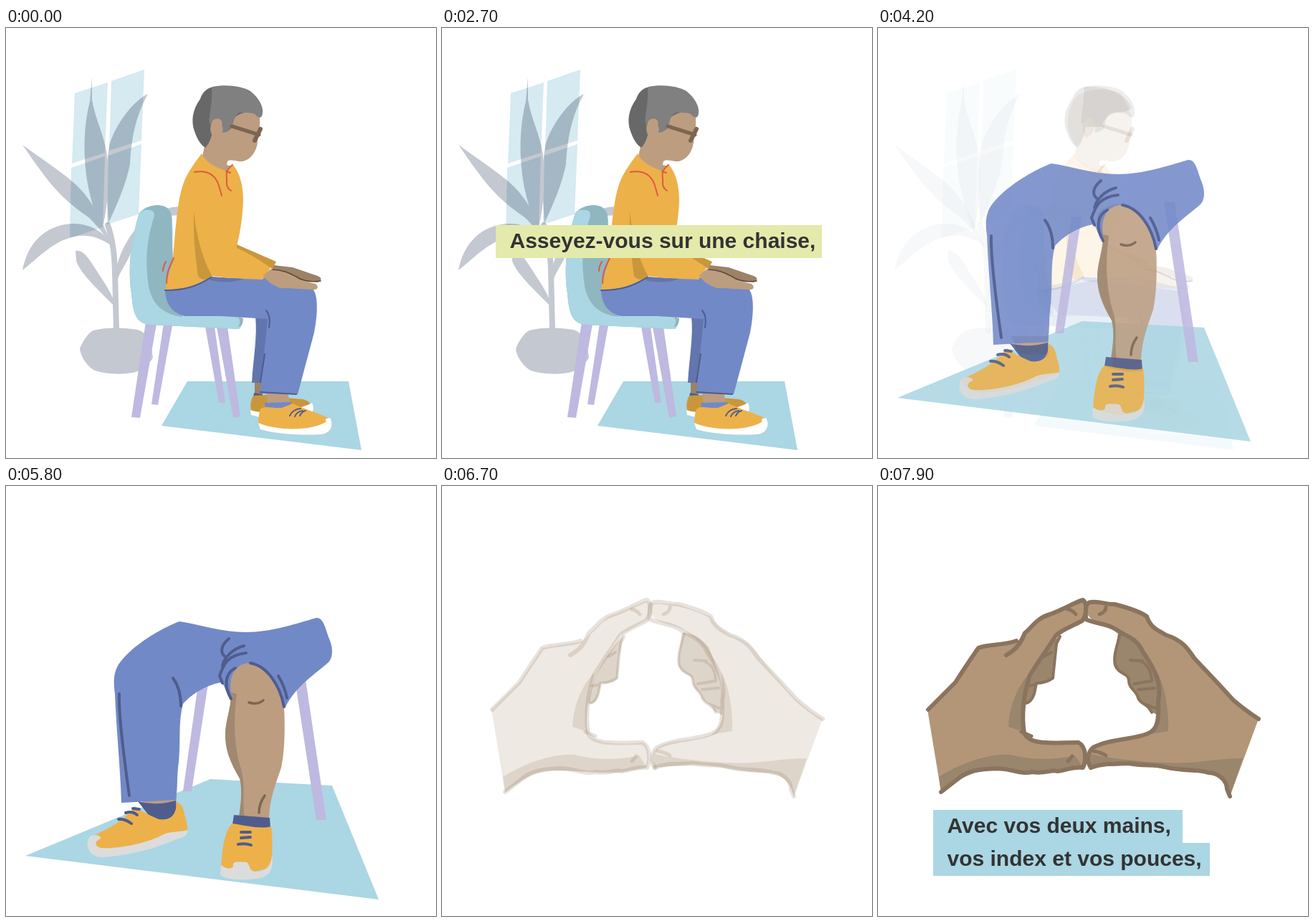
Animation, 600 px wide and 600 px high, one loop 8000 ms. Source, as an HTML page with a canvas:

```html
<!DOCTYPE html>
<html lang="fr">
<head>
<meta charset="utf-8">
<title>Exercice sur une chaise</title>
<style>
html, body { margin: 0; width: 100%; height: 100%; overflow: hidden; background: #fff; }
canvas { display: block; width: 600px; height: 600px; }
</style>
</head>
<body>
<canvas id="stage" width="600" height="600"></canvas>
<script>
const ctx = document.getElementById('stage').getContext('2d');
const LOOP = 8000, STEP = 100;

const SKY = '#abd6e3', SKY_DARK = '#90b6c0', LILAC = '#beb9e0', GREY = '#c4c8d0';
const AMBER = '#edb14a', AMBER_DARK = '#c9973b', RED = '#dd5b3f';
const BLUE = '#7289c8', BLUE_DARK = '#6375ad', NAVY = '#4f5d8d';
const SKIN = '#bc9d80', SKIN_DARK = '#9c8268', BROWN = '#7d6650';
const PALM = '#b39678', PALM_DARK = '#9a856d', EDGE = '#8b745e';

const shape = (color, d, mode) => ({ color, path: new Path2D(d), mode });
const line = (color, width, d) => ({ color, width, path: new Path2D(d) });
// The same outline filled twice, so it stays denser while fading.
const layered = (under, over, d) => [shape(under, d), shape(over, d)];

const plantAndWindow = [
  shape(GREY, 'M120 68L117 102C110 130 107 165 112 205C116 235 126 265 134 283C142 250 146 205 140 172C136 148 124 125 120 100Z'),
  shape(GREY, 'M198 92C175 103 150 140 144 165C138 200 141 240 143 272C158 240 168 215 173 190C175 155 180 125 198 92Z'),
  shape(GREY, 'M23 163C60 190 95 212 110 232C124 250 134 268 149 306C138 290 128 276 115 264C88 246 66 224 50 201C40 188 32 176 23 163Z'),
  shape(GREY, 'M23 338C30 300 55 275 92 273C115 272 140 285 149 305C128 290 112 288 96 291C66 297 46 320 23 338Z'),
  shape(GREY, 'M97 311C108 309 115 321 126 338C136 354 150 372 153 390C136 372 104 344 98 325Z'),
  shape(GREY, 'M154 336C162 300 190 252 242 249C260 247 280 252 300 262C270 261 240 260 220 263C200 268 188 280 180 295C175 320 160 338 156 350Z'),
  line(GREY, 8, 'M142 275Q151 300 152 340L154 422'),
  shape(GREY, 'M103 447C108 436 114 426 122 422C140 417 165 418 183 421C194 424 198 432 202 440L205 460C200 470 190 473 184 479C165 485 140 483 124 478C115 473 104 460 103 447Z'),
  shape('#d5eaf1', 'M96 91L142 76L138 174L92 189ZM147 74L193 58L189 157L144 171ZM91 195L138 179L135 278L89 293ZM143 178L189 162L185 260L141 274Z', 'multiply')
];

const chair = [
  shape(SKY, 'M253 493L478 493L496 589L217 555Z'),
  shape(LILAC, 'M220 412L232 415L212 526L203 525Z'),
  shape(LILAC, 'M278 417L291 417L306 523L297 523Z'),
  shape(LILAC, 'M195 410L210 413L187 544L175 543Z'),
  shape(LILAC, 'M294 417L309 417L327 542L317 544Z'),
  ...layered(SKY_DARK, SKY, 'M186 258C195 247 220 243 228 254C234 262 232 290 232 320L242 401L324 402C332 404 331 415 325 420L200 414C180 412 177 395 175 370C169 330 176 290 186 258Z'),
  shape(SKY_DARK, 'M190 255C205 243 228 245 231 262L233 325L246 403C222 400 204 388 199 360C193 320 198 290 207 262C208 254 200 252 190 255Z'),
  shape(SKY_DARK, 'M331 405C331 413 328 417 323 417C327 414 327 407 324 403Z')
];

const sitterLegs = [
  shape(SKIN_DARK, 'M347 492L357 492L358 515L347 515Z'),
  shape(NAVY, 'M346 509L358 511L359 518L345 516Z'),
  shape(AMBER_DARK, 'M345 513C340 522 341 531 343 537L424 535C429 527 424 520 414 518L390 516L365 512Z'),
  shape('#fff', 'M341 533C360 540 405 535 427 523C430 529 429 535 425 540L354 543L342 540Z'),
  shape(BLUE_DARK, 'M228 366L300 352L422 367L428 402L405 505L358 495L343 495C345 460 351 430 348 403L252 400Z'),
  shape(SKIN, 'M363 509L393 509L397 526L365 526Z'),
  shape(BLUE, 'M361 523L398 522L400 529Q384 535 362 530Z'),
  shape(AMBER, 'M355 532C360 526 370 531 385 530L400 524C415 531 440 539 452 545C455 555 440 560 425 559C400 562 370 560 352 552C352 545 353 537 355 532Z'),
  shape('#fff', 'M352 551C380 563 430 562 447 549Q443 545 452 544C457 552 455 565 440 567C410 569 375 566 355 560Z'),
  line(NAVY, 2, 'M396 541Q400 532 411 531M403 542Q406 535 414 534M410 541Q413 535 418 534'),
  shape(BLUE, 'M222 364C235 358 260 358 286 347C310 349 340 350 362 348L428 364C436 373 435 400 430 425L407 511L355 510C358 470 362 440 365 406L300 402L250 402C232 398 222 385 222 364Z'),
  line(NAVY, 2, 'M363 394Q370 402 367 418M361 455L355 494M355 508L405 511')
];

const sitterBody = [
  shape(SKIN, 'M277 165C264 150 260 128 272 102C282 84 320 82 340 92L354 122C355 142 352 148 351 160C349 174 341 183 331 186C322 187 314 182 309 186L308 191L315 193L311 202C298 200 280 188 274 179Z'),
  shape(AMBER, 'M273 175C277 185 287 192 308 200L316 190C327 203 331 220 331 242C330 265 326 290 322 304L375 326L358 351C330 350 310 349 287 346C265 360 245 366 222 365C226 345 231 335 233 320C236 290 238 250 245 225C250 205 262 190 273 175Z'),
  shape(AMBER_DARK, 'M262 257C266 290 273 320 288 347C282 353 272 352 268 346C264 320 261 285 262 257Z'),
  shape(AMBER_DARK, 'M322 302L377 326L372 336L355 325Q340 315 322 307Z'),
  shape(BLUE_DARK, 'M285 347Q305 349 331 350Q310 358 285 352Z'),
  line(NAVY, 2, 'M222 366C250 366 268 360 286 348'),
  line(RED, 2, 'M263 201C281 198 291 205 296 217Q299 226 301 234M316 191C303 201 309 208 308 214Q307 223 314 227M307 200L313 202M219 339Q219 333 223 326M224 356C224 341 228 334 234 321'),
  shape('#686868', 'M289 82C281 84 274 89 271 99C260 114 258 130 263 144C267 156 272 163 278 167C285 160 287 150 290 138L312 138Q316 117 345 117L354 112C345 88 310 80 289 82Z'),
  shape('#808080', 'M289 82C305 78 330 81 341 88C350 95 360 108 358 119C357 128 351 125 347 120C342 118 332 118 326 118C317 122 318 135 314 141Q308 146 302 146C304 137 302 128 296 126C290 126 285 133 284 136C282 120 289 105 287 83Z'),
  shape(SKIN, 'M286 135C287 126 298 123 301 130C304 139 300 150 291 153C286 149 284 142 286 135Z'),
  line(BROWN, 5, 'M315 137L353 149'),
  line(BROWN, 6, 'M355 141L347 157'),
  shape(SKIN_DARK, 'M374 331L400 334L435 346C441 348 441 353 435 355L415 352L385 339L371 337Z'),
  shape(SKIN, 'M359 345L371 335L391 340L415 353L432 357C437 361 435 366 428 365C410 364 395 363 383 363C372 359 362 352 359 345Z'),
  line('#5e4936', 1.6, 'M372 337C390 338 397 343 405 347Q418 356 439 353')
];

const sitter = [...plantAndWindow, ...chair, ...sitterLegs, ...sitterBody];

const legs = [
  shape(SKY, 'M285 409L455 418L520 577L27 516Z'),
  shape(LILAC, 'M270 263L284 263L259 426L247 426Z'),
  shape(LILAC, 'M399 243L414 243L447 466L433 466Z'),
  shape(SKIN, 'M308 258C316 248 328 246 337 246C364 249 384 280 388 309C390 345 388 375 384 393C375 420 366 440 367 476L327 476C330 440 332 425 327 410C316 390 306 365 306 345C308 320 314 310 314 296C306 285 303 268 308 258Z'),
  shape('#a08970', 'M314 288L322 290C318 320 317 360 328 395C335 420 329 440 333 462L325 462C328 440 330 425 326 408C312 385 305 365 306 345C307 325 314 310 314 288Z'),
  shape(SKIN, 'M186 430L238 430L237 455L196 455Z'),
  shape(BLUE, 'M242 189C270 193 300 204 335 204C370 204 405 192 433 184C443 183 446 200 451 213C457 227 456 240 450 246C430 264 405 278 389 310L387 308C381 280 362 250 337 247C318 250 308 268 316 298C307 291 306 280 301 274C285 276 262 287 247 304C240 330 244 355 241 385C238 405 240 420 237 438L161 442C160 400 154 340 152 290C149 265 150 252 172 232C190 215 220 197 242 189Z'),
  line(NAVY, 4, 'M158 290C157 320 164 375 172 432M233 268Q244 283 244 307'),
  line(NAVY, 4, 'M311 213C298 224 299 234 307 239M332 223C316 227 304 240 302 251M335 233C310 236 304 247 298 265L302 275'),
  line(NAVY, 4, 'M320 254C304 262 305 281 314 297M341 247C364 251 382 277 388 308M380 265Q389 280 392 296'),
  line(BROWN, 3.5, 'M339 302Q351 306 359 299M361 432Q353 443 353 456'),
  shape(NAVY, 'M184 440Q209 447 237 439L238 456C225 470 210 467 198 458Z'),
  shape(AMBER, 'M180 447C190 455 202 460 213 465C228 468 238 460 238 441C248 444 248 455 251 465C254 475 254 481 251 484C225 488 200 502 170 506C150 510 130 510 121 498L117 490C140 480 164 468 180 447Z'),
  shape('#dcdcdc', 'M117 489C122 486 133 487 132 492C123 496 123 502 132 505C160 507 200 497 218 487C230 481 245 483 253 480C254 486 250 490 240 492C215 503 180 515 135 518C115 518 109 500 117 489Z'),
  line(NAVY, 4, 'M157 465Q166 464 175 471M167 456Q176 453 183 459M177 450L186 451'),
  shape(NAVY, 'M318 459L368 463L369 478C355 482 330 478 316 472Z'),
  shape(AMBER, 'M316 471C335 474 355 479 370 475C372 490 372 510 370 532L335 541L300 531C302 505 305 480 316 471Z'),
  shape('#dcdcdc', 'M300 529C305 533 313 536 317 531C316 524 320 524 336 525C342 530 338 538 350 538C362 538 370 530 371 516C374 532 370 545 350 548C325 551 305 549 299 542Z'),
  line(NAVY, 4, 'M328 483L341 483M328 491L341 490M324 500Q334 498 342 501')
];

const leftHand = [
  ...layered(PALM, PALM_DARK, 'M253 209C235 228 213 255 204 302C210 307 216 301 219 290L222 275C232 277 243 272 245 268L247 240Z'),
  line(EDGE, 4, 'M254 210L249 220L244 268Q234 275 221 275L218 290Q214 301 207 303M232 238L242 232M209 279L221 277'),
  shape(PALM, 'M69 312L108 274L140 226L195 217L230 183L286 160L290 163L288 186L248 208C238 225 215 255 209 285C200 310 200 335 205 349C225 362 255 360 280 358C290 362 290 385 286 393L255 398C225 402 180 395 140 398C120 402 105 415 88 427Z'),
  shape(PALM_DARK, 'M85 406C110 390 150 373 185 375C215 383 250 382 275 376L286 393L255 399C220 404 180 395 150 397C125 400 105 415 88 428Z'),
  shape(PALM_DARK, 'M213 260C193 280 183 310 182 336L203 343C200 320 205 290 213 260Z'),
  line(EDGE, 6, 'M70 312L108 274Q122 252 140 226C155 220 175 223 193 216M179 236C195 227 200 217 205 205C215 197 222 184 240 179C260 172 275 162 286 159C293 164 291 180 285 188C270 196 255 201 248 209C238 225 222 247 212 264C203 290 200 320 204 345C213 364 252 357 280 358C292 365 290 385 286 393C270 391 260 398 250 398C240 395 235 402 215 399C200 403 185 394 165 394C140 395 125 398 115 406Q102 416 88 427'),
  line(EDGE, 5, 'M265 172Q271 173 276 179M271 377L265 384M200 343L214 349')
];

const rightHand = [
  ...layered(PALM, PALM_DARK, 'M335 205C333 225 328 235 330 250C335 265 348 260 350 272C350 285 360 285 363 297C370 306 375 303 380 314L391 320C397 290 385 255 372 225C355 205 340 205 335 205Z'),
  line(EDGE, 4, 'M338 206C333 225 328 237 331 250C336 264 350 260 350 272C350 283 361 285 363 296C368 306 376 303 382 316M352 243L369 244M367 245Q381 251 382 272L357 276M363 284L386 282M372 304L387 310'),
  shape(PALM, 'M290 163L330 165L375 182C385 198 395 205 420 215C440 228 450 250 470 270C485 290 505 310 531 325L491 433C485 415 480 405 460 400C430 401 405 392 380 391C350 388 320 391 295 393C290 385 292 372 300 365C320 352 350 357 375 347C390 340 393 325 391 305C395 280 380 250 368 228C355 211 338 200 325 196C305 190 288 188 290 163Z'),
  shape(PALM_DARK, 'M297 374C320 379 360 385 400 386C440 389 470 380 509 380L491 433C485 410 475 402 450 400C410 400 395 391 350 388L296 393Z'),
  shape(PALM_DARK, 'M390 260C400 280 406 310 405 342L375 347C390 338 394 320 392 300Z'),
  line(EDGE, 6, 'M290 186C290 175 288 163 297 162C310 160 318 166 330 165C350 170 365 175 375 182C380 198 392 202 402 208C425 215 433 228 441 240C458 258 483 284 495 298Q511 312 531 325M290 186C305 193 318 191 332 200C345 210 360 210 370 232C388 258 396 278 391 300C392 325 391 341 375 346C350 355 322 353 300 365C291 373 292 386 297 393'),
  line(EDGE, 6, 'M297 393C315 386 333 388 350 387C372 391 385 388 400 392C420 398 445 394 461 400C475 400 487 411 487 423L491 433'),
  line(EDGE, 5, 'M318 169Q318 176 309 179M301 370Q310 371 318 376')
];

const hands = [...leftHand, ...rightHand];

function drawScene(parts, alpha) {
  if (alpha <= 0) return;
  ctx.globalAlpha = alpha;
  for (const p of parts) {
    ctx.globalCompositeOperation = p.mode || 'source-over';
    if (p.width) {
      ctx.strokeStyle = p.color;
      ctx.lineWidth = p.width;
      ctx.stroke(p.path);
    } else {
      ctx.fillStyle = p.color;
      ctx.fill(p.path);
    }
  }
  ctx.globalCompositeOperation = 'source-over';
}

function label(text, x, y, w, pad, base, color, alpha) {
  if (alpha <= 0) return;
  ctx.globalAlpha = alpha;
  ctx.fillStyle = color;
  ctx.fillRect(x, y, w, 46);
  ctx.fillStyle = '#333';
  ctx.fillText(text, x + pad, base);
}

const ramp = (t, from, to) => Math.min(1, Math.max(0, (t - from) / (to - from)));

function frame(now) {
  const t = Math.floor((now % LOOP) / STEP) * STEP;
  ctx.globalAlpha = 1;
  ctx.fillStyle = '#fff';
  ctx.fillRect(0, 0, 600, 600);

  const swap = ramp(t, 3680, 4280);
  drawScene(sitter, 1 - swap);
  drawScene(legs, swap * (1 - ramp(t, 5950, 6600)));
  drawScene(hands, ramp(t, 6575, 7175));

  const first = ramp(t, 300, 700) * (1 - ramp(t, 3100, 3500));
  label('Asseyez-vous sur une chaise,', 75, 275, 455, 19.5, 307, '#e4eaab', first);
  const last = ramp(t, 7350, 7750);
  label('Avec vos deux mains,', 77, 452, 348, 19.5, 484, SKY, last);
  label('vos index et vos pouces,', 77, 498, 386, 19.5, 530, SKY, last);
  requestAnimationFrame(frame);
}

ctx.lineCap = ctx.lineJoin = 'round';
ctx.font = 'bold 30px "Liberation Sans", Arial, sans-serif';
requestAnimationFrame(frame);
</script>
</body>
</html>
```
